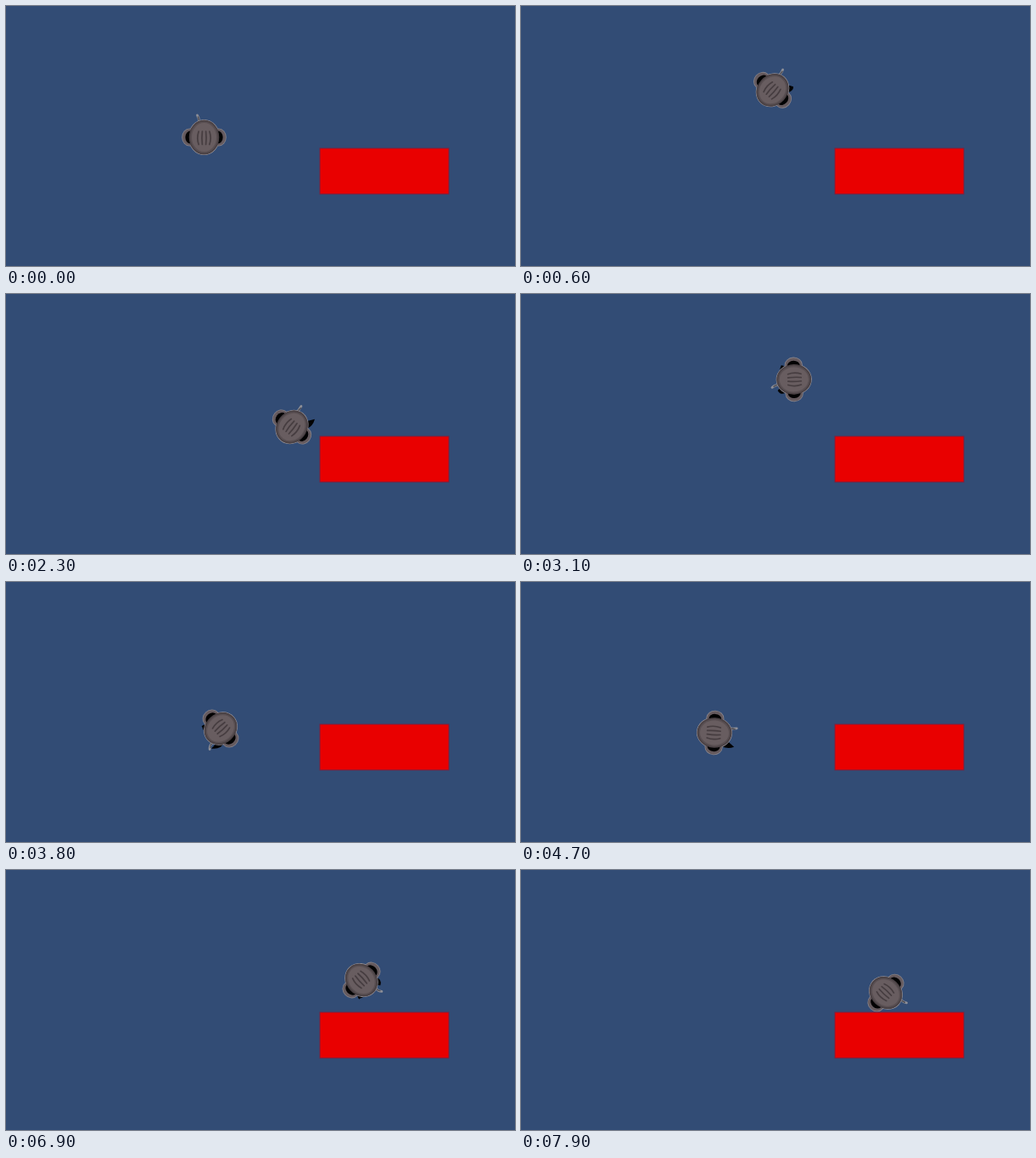
An HTML page with a canvas that plays this animation: 600 px wide and 307 px high, repeating every 8 s.

```html
<!DOCTYPE html>
<html>
<head>
<meta charset="utf-8">
<style>
html, body { margin: 0; height: 100%; overflow: hidden; background: #324c75; }
canvas { display: block; }
</style>
</head>
<body>
<canvas id="stage" width="600" height="307"></canvas>
<script>
const ctx = document.getElementById('stage').getContext('2d');
const LOOP = 8000, STEP = 100, TAU = Math.PI * 2;

// Waypoints: time, x, y, heading in degrees (0 = up, clockwise)
const path = [
  [0, 233.5, 155, 0], [200, 247, 141, 46], [800, 318, 79, 40],
  [1000, 317, 65, -80], [1200, 295, 78, -142], [1700, 251, 143, -190],
  [2000, 291, 166, -275], [2300, 337, 157, -322], [2700, 355, 100, -365],
  [2900, 340, 84, -440], [3800, 253, 173, -492], [4250, 186, 177, -475],
  [4700, 228, 178, -627], [5500, 345.5, 155, -630], [5700, 358, 155, -630],
  [6300, 361, 155, -670], [6900, 419, 130, -582], [7300, 434, 147, -570],
  [7650, 431, 153, -545], [7900, 430, 145, -587]
];

// Smooth curve through the waypoints; the heading turns evenly between them.
function poseAt(t) {
  const last = path.length - 1;
  const i = Math.min(last - 1, path.findLastIndex(k => k[0] <= t));
  const a = path[i], b = path[i + 1], before = path[Math.max(0, i - 1)];
  const after = path[Math.min(last, i + 2)];
  const span = b[0] - a[0], f = Math.min(1, (t - a[0]) / span);
  const curve = n => {
    const slopeA = (b[n] - before[n]) / (b[0] - before[0]) * span;
    const slopeB = (after[n] - a[n]) / (after[0] - a[0]) * span;
    const ease = f * f * (3 - 2 * f);
    return a[n] + (b[n] - a[n]) * ease
      + f * (1 - f) * ((1 - f) * slopeA - f * slopeB);
  };
  return { x: curve(1), y: curve(2), heading: a[3] + (b[3] - a[3]) * f };
}

const isWalking = t => t > 0 && t < 5700 || t > 6300 && t < 7300;

function ellipse(x, y, rx, ry, color) {
  ctx.beginPath();
  ctx.ellipse(x, y, rx, ry, 0, 0, TAU);
  ctx.fillStyle = color;
  ctx.fill();
}

function stroke(x1, y1, cx, cy, x2, y2, color, width) {
  ctx.beginPath();
  ctx.moveTo(x1, y1);
  ctx.quadraticCurveTo(cx, cy, x2, y2);
  ctx.strokeStyle = color;
  ctx.lineWidth = width;
  ctx.stroke();
}

function arm(side, tipX, tipY) {
  ctx.beginPath();
  ctx.moveTo(side * 7, -14);
  ctx.quadraticCurveTo(side * 11, -18, tipX, tipY);
  ctx.quadraticCurveTo(side * 19, -16, side * 15, -9);
  ctx.fillStyle = '#030304';
  ctx.fill();
}

function drawBody() {
  // The pale rim goes below everything, so it shows only around the outside.
  for (const [rim, ear, head] of [[0.8, '#85828a', '#918c92'], [0, '#655a5e', '#4a4144']]) {
    for (const x of [-17, 17]) ellipse(x, 0, 8.5 + rim, 9.8 + rim, ear);
    ellipse(0, 0, 17.8 + rim, 20.3 + rim, head);
  }
  for (const x of [-17, 17]) ellipse(x * 0.95, 0, 6, 7.5, '#020203');
  ellipse(0, 0, 17.8, 20.3, '#4a4144');
  ellipse(0, 0, 16.2, 18.6, '#594f52');
  ellipse(0, 0, 14.5, 17, '#685d60');
  for (const x of [-7.5, -2.5, 2.5, 7.5])
    stroke(x * 0.85, -7, x * 1.2, 1, x * 0.85, 8.5, '#463d40', 1.7);
}

function drawWalker(t) {
  const { x, y, heading } = poseAt(t);
  const swing = isWalking(t) ? Math.sin((t - 50) / 600 * TAU) : 0;
  const left = Math.max(0, swing), right = Math.max(0, -swing);
  ctx.save();
  ctx.translate(x, y);
  ctx.rotate(heading * Math.PI / 180);
  ctx.lineCap = 'round';
  if (left) arm(-1, -15 + 5 * left, -15 - 9 * left);
  if (swing) arm(1, 15.5, -15 - 9 * right);
  const tip = -8 - 1.6 * swing;
  stroke(-6, -19, -6, -23, tip, -26, '#8d8f98', 2.8);
  stroke(-6, -19, -6, -22, tip + 1, -24, '#4c4a50', 1.4);
  drawBody();
  ctx.restore();
}

function draw(now) {
  const t = Math.floor(now % LOOP / STEP) * STEP;
  ctx.fillStyle = '#324c75';
  ctx.fillRect(0, 0, 600, 307);
  ctx.fillStyle = '#e90000';
  ctx.fillRect(370, 168, 152, 54);
  ctx.strokeStyle = '#7a2040';
  ctx.lineWidth = 1;
  ctx.strokeRect(370, 168, 152, 54);
  drawWalker(t);
}

const start = performance.now();
function tick() {
  draw(performance.now() - start);
  requestAnimationFrame(tick);
}
tick();
</script>
</body>
</html>
```
